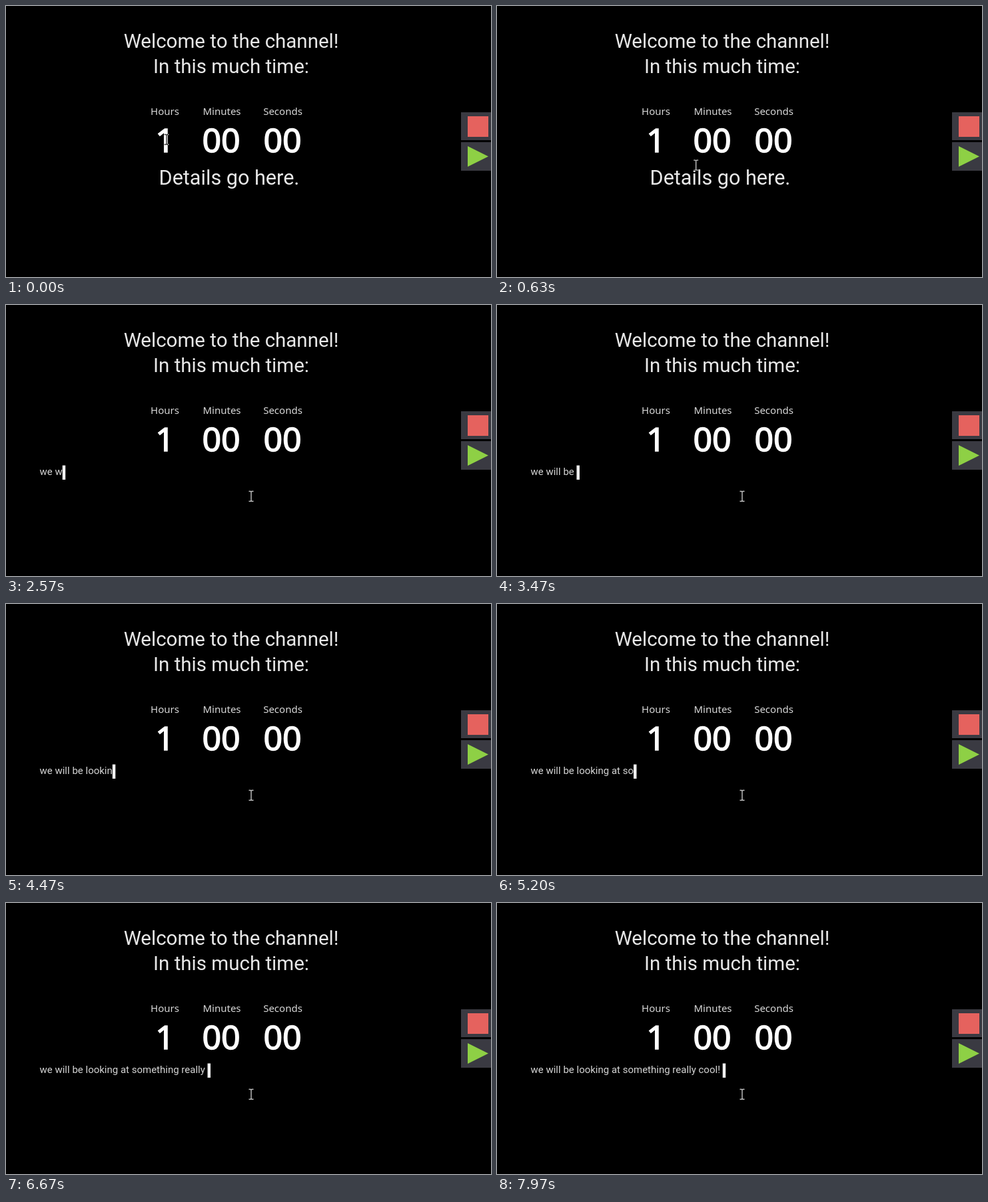
Write an HTML page that moves like this. It is 728 px wide and 408 px high and loops after 8 s.

```html
<!DOCTYPE html>
<html lang="en">
<head>
<meta charset="utf-8">
<title>Countdown</title>
<style>
  html, body { margin: 0; width: 728px; height: 408px; overflow: hidden; background: #000; }
  svg { display: block; }
  text { fill: #e8e8e8; white-space: pre; }
  .head { font: 29.5px Roboto, sans-serif; text-anchor: middle; }
  .label { font: 15px "Noto Sans", sans-serif; text-anchor: middle; fill: #d8d8d8; }
  .digits { font: 50px "Noto Sans", sans-serif; text-anchor: middle; fill: #fff;
            stroke: #fff; stroke-width: 1.5px; }
  #details { font-size: 30.6px; }
  #typed { font: 15px Roboto, sans-serif; fill: #d4d4d4; }
  #mouse { fill: none; stroke: #c4c4c4; stroke-width: 1.4px; mix-blend-mode: difference; }
</style>
</head>
<body>
<svg width="728" height="408" viewBox="0 0 728 408">
  <rect width="728" height="408"/>
  <text class="head" x="338" y="62.5">Welcome to the channel!</text>
  <text class="head" x="338" y="100.5">In this much time:</text>

  <text class="label" x="238.5" y="164">Hours</text>
  <text class="label" x="324" y="164">Minutes</text>
  <text class="label" x="415.5" y="164">Seconds</text>
  <text class="digits" x="238.5" y="219.5">1</text>
  <text class="digits" x="323" y="219.5">00</text>
  <text class="digits" x="415" y="219.5">00</text>

  <text class="head" id="details" x="335" y="269">Details go here.</text>
  <text id="typed" x="50.5" y="256"></text>
  <rect id="caret" y="241.5" width="4.5" height="21.5" fill="#f2f2f2"/>

  <path d="M683 160h45v42h-45zM683 205h45v43h-45z" fill="#3a3a42"/>
  <rect x="693" y="166" width="31" height="31" fill="#e5625e"/>
  <path d="M693 211L724 226.5L693 242z" fill="#8ed045"/>

  <path id="mouse" d="M-3.5-7.5h2.5l1 1l1-1h2.5M0-6.5v13M-3.5 7.5h2.5l1-1l1 1h2.5"/>
</svg>
<script>
const LOOP = 8000, CLICK = 950, BLINK = 350, LEFT = 50.5;
const MESSAGE = "we will be looking at something really cool! ";
const keyTimes = [
  2170, 2300, 2430, 2570, 2700, 2900, 3070,             // we will
  3200, 3300, 3400, 3470,                               // be
  3630, 3830, 3970, 4130, 4300, 4470, 4600,             // looking
  4700, 4800, 4870, 4930,                               // at
  5070, 5170, 5270, 5370, 5470, 5570, 5670, 5770, 5870, // something
  5970, 6050, 6130, 6200, 6250, 6300, 6470, 6670,       // really
  6830, 6930, 7070, 7230, 7500, 7700                    // cool!
];
const mousePath = [[170, 241, 201], [970, 335, 264], [1230, 368, 288]];

const [details, typed, caret, mouse] =
  ["details", "typed", "caret", "mouse"].map(id => document.getElementById(id));
const show = (el, on) => el.setAttribute("visibility", on ? "visible" : "hidden");
const smooth = u => u * u * (3 - 2 * u);

function mouseAt(t) {
  let [, x, y] = mousePath[0];
  for (let i = 1; i < mousePath.length; i++) {
    const [t0, x0, y0] = mousePath[i - 1], [t1, x1, y1] = mousePath[i];
    if (t < t0) break;
    const u = smooth(Math.min(1, (t - t0) / (t1 - t0)));
    x = x0 + (x1 - x0) * u;
    y = y0 + (y1 - y0) * u;
  }
  return [x, y];
}

function draw(t) {
  const count = keyTimes.filter(k => k <= t).length;
  const blinkOn = Math.floor((t - CLICK) / BLINK) % 2 === 0;
  typed.textContent = MESSAGE.slice(0, count);
  caret.setAttribute("x", LEFT + (count ? typed.getComputedTextLength() : 0));
  show(details, t < CLICK);
  show(caret, t >= CLICK && (count > 0 || blinkOn));
  mouse.setAttribute("transform", `translate(${mouseAt(t)})`);
}

const start = performance.now();
function frame() {
  draw((performance.now() - start) % LOOP);
  requestAnimationFrame(frame);
}
frame();
</script>
</body>
</html>
```
